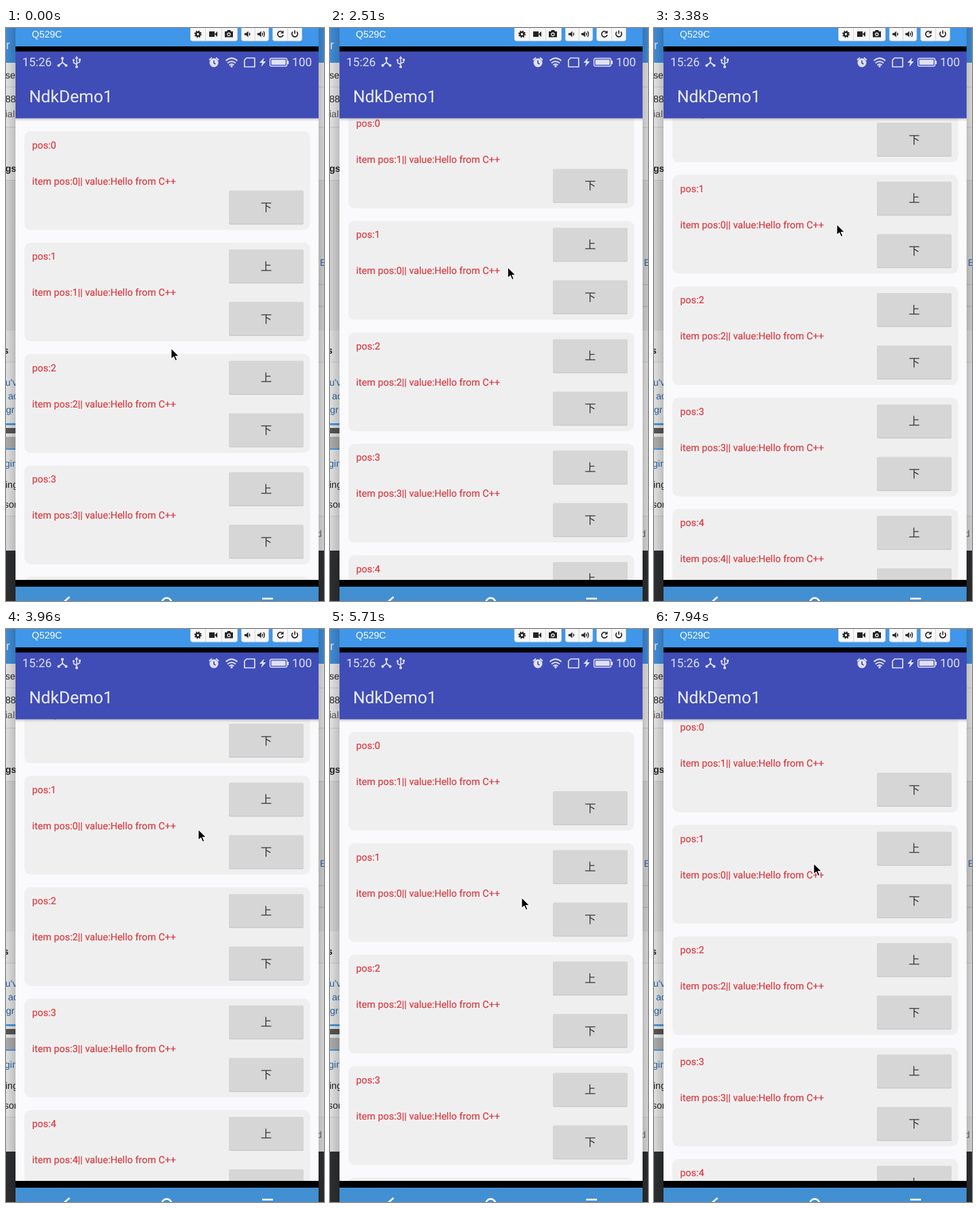
These frames come from a looping animation (468 by 841 pixels, 8 s). An HTML page:

```html
<!DOCTYPE html>
<html lang="en">
<head>
<meta charset="utf-8">
<style>
  html, body { margin: 0; width: 100%; height: 100%; overflow: hidden; }
  svg { display: block; width: 468px; height: 841px; }
  text { white-space: pre; text-rendering: geometricPrecision; }
  .side { font: 14px "Liberation Sans", sans-serif; fill: #222; }
  .link { fill: #2765a8; }
  .bold { font-weight: bold; }
  .phone { font-family: Roboto, sans-serif; fill: #dfe1f3; }
  .red { font: 14.4px Roboto, sans-serif; fill: #d73b40; stroke: #d73b40; stroke-width: .2; }
  .key { font: 16.5px "Noto Sans CJK SC", "Noto Sans CJK", sans-serif; fill: #333; text-anchor: middle; }
  .line { fill: none; stroke: #dfe1f3; stroke-width: 1.7; }
  .ink { fill: none; stroke: #222; stroke-width: 1.6; }
</style>
</head>
<body>
<svg viewBox="0 0 468 841">
  <defs>
    <clipPath id="screen"><rect x="14" y="132" width="446" height="678"/></clipPath>
    <linearGradient id="shade" x2="0" y2="1">
      <stop stop-color="#000" stop-opacity=".2"/><stop offset="1" stop-color="#000" stop-opacity="0"/>
    </linearGradient>
    <linearGradient id="edge">
      <stop stop-color="#000" stop-opacity="0"/><stop offset="1" stop-color="#000" stop-opacity=".15"/>
    </linearGradient>
  </defs>

  <!-- page behind the phone window -->
  <g id="page"></g>
  <g class="side">
    <text x="0" y="31" style="font-size:18px;fill:#dce9f6">r</text>
    <text x="-1" y="74">se</text>
    <text x="-1" y="109">88</text>
    <text x="-1" y="131" style="fill:#555">ial</text>
    <text x="-1" y="211" class="bold">gs</text>
    <text x="-4" y="478" class="bold">s</text>
    <text x="-1" y="525" class="link">u'v</text>
    <text x="3" y="545" class="link">ac</text>
    <text x="0" y="565" class="link">gr</text>
    <text x="-2" y="644" class="link">gin</text>
    <text x="-1" y="675">ing</text>
    <text x="-3" y="704">son</text>
    <text x="462" y="349" class="link">E</text>
    <text x="457" y="747" style="fill:#666">d</text>
  </g>
  <rect id="side" width="14" height="841" fill="url(#edge)"/>
  <use href="#side" transform="translate(474 0) scale(-1 1)"/>

  <!-- window frame -->
  <rect x="14" width="446" height="841" fill="#4096e8"/>
  <text x="38" y="14" style="font:14px 'Liberation Sans',sans-serif;fill:#fff">Q529C</text>
  <g fill="#f7f7f7" stroke="#c9d3dd" stroke-width=".8">
    <rect x="271.5" y="-4" width="69" height="23" rx="3"/>
    <rect x="346.5" y="-4" width="40" height="23" rx="3"/>
    <rect x="392.5" y="-4" width="43" height="23" rx="3"/>
    <path d="M293.500 0V19M317.500 0V19M366.500 0V19M414.500 0V19"/>
  </g>
  <circle cx="282.500" cy="9" r="2.900" class="ink" style="stroke-width:2.400"/>
  <circle cx="282.500" cy="9" r="4.600" class="ink" stroke-dasharray="1.800 1.813"/>
  <g fill="#222">
    <path d="M299 5h8v8h-8zM307 9l4-4v8z"/>
    <path d="M322 5h3l1-2h4l1 2h3v8.500h-12z"/>
    <path d="M351 7.500h2.500l3-3v9l-3-3h-2.500zM370 7.500h2.500l3-3v9l-3-3h-2.500z"/>
    <path d="M408.500 3.500v4.500h-4.500z"/>
  </g>
  <circle cx="328" cy="9.300" r="2.100" fill="#222" stroke="#f7f7f7" stroke-width="1.200"/>
  <path class="ink" style="stroke-width:1.300" d="M358 7q1.600 2 0 4M377 7q1.600 2 0 4M379 5q3 4 0 8"/>
  <path class="ink" d="M407 6a4.200 4.200 0 1 0 1 4M422 5.500a4.300 4.300 0 1 0 6 0M425 3.500v5"/>

  <!-- list -->
  <rect x="14" y="27" width="446" height="793" fill="#000"/>
  <rect x="14" y="132" width="446" height="678" fill="#faf9fc"/>
  <g clip-path="url(#screen)"><g id="list"></g></g>
  <rect x="14" y="132" width="446" height="5" fill="url(#shade)"/>

  <!-- status and title bars -->
  <rect x="14" y="34.500" width="446" height="98" fill="#404db7"/>
  <g class="phone">
    <text x="24" y="55.700" font-size="17.400">15:26</text>
    <text x="421" y="55.700" font-size="17.300">100</text>
    <text x="34" y="109" font-size="24.700" style="fill:#eceefa">NdkDemo1</text>
    <circle cx="306" cy="51" r="6.500"/>
    <path d="M299 47l4-3.500M313 47l-4-3.500" class="line"/>
    <path d="M306 47.500v4l2.500 1.500" class="line" style="stroke:#404db7"/>
    <path d="M326 51.500q6-5 12 0M323.500 48q8.500-7.500 17 0M328.500 54.500q3.500-3 7 0" class="line"/>
    <circle cx="332" cy="56" r="1.700"/>
    <path d="M354 44h12v13h-15v-10z" class="line" stroke-linejoin="round"/>
    <path d="M380 43.500l-7 7.500h4l-1.500 6 7-8h-4z"/>
    <rect x="388.500" y="44.500" width="25" height="11.500" rx="2" class="line" style="stroke-width:1.400"/>
    <rect x="390.500" y="46.500" width="21" height="7.500"/><rect x="414" y="48" width="2" height="5"/>
    <path d="M83 44v6.500l-5.500 4.500M83 50.500l5.500 4.500" class="line"/>
    <circle cx="83" cy="44.500" r="2"/><circle cx="77.500" cy="55" r="2"/><circle cx="88.500" cy="55" r="2"/>
    <path d="M104 43v13M99.500 47.500v3.500l4.500 2.500M108.500 46.500v3.500l-4.500 2" class="line" style="stroke-width:1.500"/>
    <path d="M101.500 45l2.500-4 2.500 4z"/><circle cx="104" cy="57" r="2"/>
    <circle cx="99.500" cy="47" r="1.600"/><rect x="107" y="45" width="3" height="3"/>
  </g>

  <!-- navigation bar -->
  <rect x="14" y="820" width="446" height="21" fill="#428fd2"/>
  <g fill="none" stroke="#fff" stroke-width="2.600">
    <path d="M93.500 835l-9.500 8.500M377 837.500h16M380 843h10"/><circle cx="236.500" cy="843.500" r="7"/>
  </g>

  <path id="cursor" d="M0 0V16L3.800 12.600 6.400 18.400 9 17.300 6.500 11.700H11.600Z" fill="#000" stroke="#fff" stroke-width="1.100"/>
</svg>
<script>
const $ = id => document.getElementById(id);
const STEP = 147, LOOP = 8000, TOP = 151.5, PITCH = 163.5;

// Bands of the page behind: top, colour.
const bands = [
  [0, '#3f8bd6'], [51, '#e2e2e2'], [86, '#cacaca'], [87, '#e2e2e2'], [145, '#c6c6c6'],
  [146, '#dfdfdf'], [223, '#c0c0c0'], [224, '#d1d1d1'], [444, '#dcdcdc'], [490, '#c8c8c8'],
  [491, '#e0e0e0'], [716, '#c8c8c8'], [717, '#dadada'], [767, '#2d2e30'], [841]
];
const band = (x, y, w, h, fill) => `<rect x="${x}" y="${y}" width="${w}" height="${h}" fill="${fill}"/>`;
$('page').innerHTML =
  bands.slice(0, -1).map(([y, fill], i) => band(0, y, 468, bands[i + 1][0] - y, fill)).join('') +
  band(0, 580, 14, 3, '#4a96dc') + band(0, 587, 14, 8, '#555') +
  band(0, 600, 14, 17, '#aaa') + band(0, 617, 14, 2, '#4a96dc') +
  band(460, 376, 8, 1, '#b5b5b5') + band(460, 408, 8, 1, '#b5b5b5');

const button = (y, label) => `
  <rect x="328" y="${y + 1}" width="110" height="49" rx="2" fill="#cbcbcd"/>
  <rect x="328" y="${y}" width="110" height="48.500" rx="2" fill="#d6d6d6"/>
  <text class="key" x="383" y="${y + 30.5}">${label}</text>`;

$('list').innerHTML = [0, 1, 2, 3, 4].map(i => `<g>
  <rect x="27" width="420.500" height="145" rx="9" fill="#f0eff0"/>
  <text class="red" x="38.500" y="25">pos:${i}</text>
  <text class="red value" x="38.500" y="78"></text>
  ${i ? button(10, '上') : ''}${button(87, '下')}</g>`).join('');
const cards = [...$('list').children];
const values = cards.map(card => card.querySelector('.value'));

// Step, pointer x, pointer y, scroll offset.
const keys = [
  [0, 243, 470, 0], [7, 245, 496, 0], [11, 247, 496, 0], [14, 258, 390, 0], [15, 258, 390, 0],
  [16, 260, 370, 14], [19, 265, 313, 67.5], [21, 267, 296, 90], [23, 269, 288, 99.5],
  [31, 297, 300, 99.5], [32, 291, 300, 99.5], [33, 291, 300, 99.5], [34, 292, 326, 84],
  [37, 286, 382, 12], [39, 282, 394, .5], [41, 255, 362, 22], [43, 60, 143, 27.5],
  [44, 60, 143, 27.5], [46, 105, 190, 27.5], [48, 66, 292, 27.5], [52, 104, 356, 27.5],
  [53, 106, 361, 27.5], [54, 235, 344, 27.5], [55, 235, 344, 27.5]
];

function pose(step) {
  const next = Math.max(1, keys.findIndex(key => key[0] >= step));
  const a = keys[next - 1], b = keys[next];
  const part = (step - a[0]) / (b[0] - a[0]);
  return a.map((v, i) => v + (b[i] - v) * part);
}

function draw(time) {
  const step = Math.floor((time % LOOP + 25) / STEP);
  const [, x, y, scroll] = pose(step);
  const swap = step === 10 ? .5 : step === 11 ? .982 : 0;
  const swapped = step >= 12;
  cards.forEach((card, i) => {
    const shift = i === 0 ? swap : i === 1 ? -swap : 0;
    card.setAttribute('transform', `translate(0 ${TOP + (i + shift) * PITCH - scroll})`);
    card.setAttribute('opacity', shift ? .75 : 1);
    values[i].textContent = `item pos:${swapped && i < 2 ? 1 - i : i}|| value:Hello from C++`;
  });
  $('cursor').setAttribute('transform', `translate(${x} ${y})`);
}

const start = performance.now();
(function tick() {
  draw(performance.now() - start);
  requestAnimationFrame(tick);
})();
</script>
</body>
</html>
```
